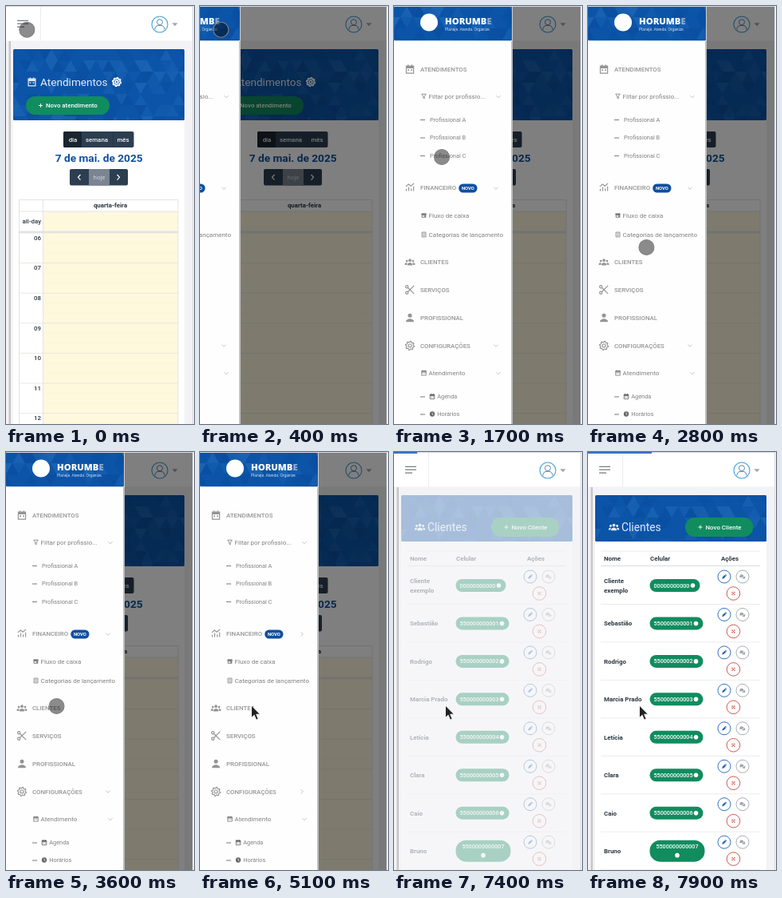
Animation of 236x523 px, one loop 8000 ms. Source, as an HTML page:

```html
<!DOCTYPE html>
<html lang="pt-BR">
<head>
<meta charset="utf-8">
<title>Agenda</title>
<style>
  html, body { margin: 0; width: 100%; height: 100%; overflow: hidden; background: #f3f4f7; }
  svg { display: block; width: 100%; height: 100%; font-family: Roboto, sans-serif; }
</style>
</head>
<body>
<svg id="stage" viewBox="0 0 236 523"></svg>
<script>
const LOOP = 8000, STEP = 100;
const BLUE = '#0e4f9f', GREEN = '#118c5e', INK = '#2b3640', MENU = '#949494', SUBMENU = '#808080';

// ---------- drawing helpers ----------
const rect = (x, y, w, h, fill, r = 0, extra = '') =>
  `<rect x="${x}" y="${y}" width="${w}" height="${h}" rx="${r}" fill="${fill}" ${extra}/>`;
const path = (d, stroke, width = 1, extra = '') =>
  `<path d="${d}" fill="none" stroke="${stroke}" stroke-width="${width}" ${extra}/>`;
const dot = (x, y, r, fill, extra = '') =>
  `<circle cx="${x}" cy="${y}" r="${r}" fill="${fill}" ${extra}/>`;
const text = (x, y, str, size, fill, weight = 400, anchor = 'start', extra = '') =>
  `<text x="${x}" y="${(y + size * 0.355).toFixed(2)}" font-size="${size}" fill="${fill}" ` +
  `font-weight="${weight}" text-anchor="${anchor}" ${extra}>${str}</text>`;
const group = (id, body, extra = '') => `<g id="${id}" ${extra}>${body}</g>`;
const list = (n, fn) => Array.from({ length: n }, (_, i) => fn(i)).join('');

// Icons live in a box from -5 to 5 and take the current colour.
const ring = (x, y, r) => `<circle cx="${x}" cy="${y}" r="${r}"/>`;
const solid = d => `<path d="${d}" fill="currentColor" stroke="none"/>`;
const line = d => `<path d="${d}"/>`;
const cog = 'M' + Array.from({ length: 32 }, (_, i) => {
  const r = i % 4 < 2 ? 4.8 : 3.7, a = (i + 0.5) * Math.PI / 16;
  return `${(r * Math.cos(a)).toFixed(2)} ${(r * Math.sin(a)).toFixed(2)}`;
}).join('L') + 'Z';
const ICONS = {
  calendar: line('M-4-3.5H4V4.5H-4ZM-4-1.4H4M-2-5V-3M2-5V-3') + solid('M-4-3.5H4V-1.8H-4ZM-2.5 .2h1.5v1.5h-1.5ZM1 .2h1.5v1.5H1Z'),
  chart: line('M-4 1.5V4M-1.3-.5V4M1.4 1V4M4-1V4M-4.5-1L-1.5-3.5 1-1.5 4.5-4.5'),
  people: solid('M-1.6-2a1.6 1.6 0 1 1 3.2 0a1.6 1.6 0 1 1-3.2 0ZM-2.8 3.5V2Q0-1 2.8 2V3.5ZM-4.6-1.3a1.2 1.2 0 1 1 2.4 0a1.2 1.2 0 1 1-2.4 0ZM2.2-1.3a1.2 1.2 0 1 1 2.4 0a1.2 1.2 0 1 1-2.4 0ZM-5.5 3V1.5Q-4.5 .2-3 .8L-3.5 3ZM5.5 3V1.5Q4.5 .2 3 .8L3.5 3Z'),
  scissors: line('M-2.2-2.2L4.5 4.5M-2.2 2.2L4.5-4.5') + ring(-3.3, -3.3, 1.4) + ring(-3.3, 3.3, 1.4),
  person: solid('M-2.2-2.4a2.2 2.2 0 1 1 4.4 0a2.2 2.2 0 1 1-4.4 0ZM-4.2 4.5V3Q0-1 4.2 3V4.5Z'),
  gear: line(cog) + ring(0, 0, 1.7),
  funnel: line('M-4-4H4L1 0V4L-1 3V0Z'),
  shop: solid('M-4-4H4L5-1H4V4H-4V-1H-5ZM-2.5 0V2.5H1V0Z'),
  note: line('M-3.5-4.2H3.5V4.2H-3.5ZM-2-1.5H2M-2 1.5H2'),
  clock: solid('M-4.5 0a4.5 4.5 0 1 1 9 0a4.5 4.5 0 1 1-9 0Z') + '<path d="M0-2.6V.3L2 1.4" stroke="#fff"/>',
  pencil: solid('M-4.5 4.5L-3.6 1 1-3.6 3.6-1-1 3.6ZM1.6-4.2L2.4-5Q3-5.2 3.5-4.6L4.6-3.5Q5.2-3 5-2.4L4.2-1.6Z'),
  chat: solid('M-5-1.2a3.4 2.6 0 1 1 6.8 0a3.4 2.6 0 0 1-4.5 2.4L-5 2ZM2.6-1.2Q2.6 1.8-1 2.3A3 2.4 0 0 0 3 3.4L5 4 4.4 2.6Q6 .2 2.6-1.2Z'),
  remove: line('M-3-3L3 3M3-3L-3 3') + line('M-4-1.6L-1.6-4M4 1.6L1.6 4M-4 1.6L-1.6 4M4-1.6L1.6-4'),
};
const icon = (name, x, y, size, color, width = 1.1) =>
  `<g transform="translate(${x} ${y}) scale(${size / 10})" color="${color}" fill="none" ` +
  `stroke="currentColor" stroke-width="${width}">${ICONS[name]}</g>`;

const random = seed => () => (seed = (seed * 16807) % 2147483647) / 2147483647;

// Blue banner with a faint mesh of triangles.
function banner(id, x, y, w, h, seed) {
  const next = random(seed), side = 16, tall = 14;
  let mesh = '';
  for (let row = 0; row * tall < h; row++) {
    for (let i = -1; i * side / 2 < w; i++) {
      const left = x + i * side / 2, top = y + row * tall, up = (i + row) & 1;
      const a = up ? top + tall : top, b = up ? top : top + tall;
      const pick = next(), alpha = next() * 0.1;
      if (pick > 0.5) mesh += `<path d="M${left} ${a}h${side}L${left + side / 2} ${b}Z" ` +
        `fill="${pick > 0.72 ? '#7fc0ff' : '#002a6a'}" opacity="${(alpha + 0.03).toFixed(2)}"/>`;
    }
  }
  return `<clipPath id="${id}">${rect(x, y, w, h, '#000', 1.5)}</clipPath>` +
    `<g clip-path="url(#${id})">${rect(x, y, w, h, '#0b54a8')}${mesh}</g>`;
}

const button = (x, y, w, h, label, textX) =>
  rect(x, y, w, h, GREEN, h / 2) +
  path(`M${textX - 9} ${y + h / 2}h5M${textX - 6.5} ${y + h / 2 - 2.5}v5`, '#fff', 0.9) +
  text(textX, y + h / 2, label, 7.9, '#fff', 500);

// ---------- scenes ----------
const chrome = () =>
  rect(0, 0, 234, 523, '#f3f3f5') + rect(0, 0, 234, 43.5, '#fff') +
  path('M43.5 0V43.5', '#ebebee') + rect(3.5, 44, 2.5, 479, '#c6c6ca') +
  path('M14 18.3H28M14 22.2H28M14 26.1H23', '#777c82', 1.3) +
  dot(193, 23, 10, '#fff', 'stroke="#3c9fdf" stroke-width="1.1"') +
  dot(193, 20.2, 3.5, 'none', 'stroke="#5c88ae"') +
  path('M187 29.5V28Q188 24.5 191 24.3H195Q198 24.5 199 28V29.5', '#5c88ae') +
  '<path d="M208.5 21.2h7l-3.5 4Z" fill="#a3a6aa"/>';

function agenda() {
  const hour = 37.6, top = 284;
  const white = '#f2f4f6';
  return chrome() + rect(9, 54, 215, 469, '#fff', 1.5) + banner('clipA', 9, 54, 215, 89, 77) +
    icon('calendar', 32.5, 95, 11, '#e3ecf6') + text(43, 95.5, 'Atendimentos', 13.6, '#e3ecf6') +
    icon('gear', 139, 95, 11, '#fff', 1.5) +
    button(25, 113, 105, 23, 'Novo atendimento', 50) +
    rect(72, 157, 88.5, 20, '#2c3e50', 2) + rect(72, 157, 23, 20, '#1a252f', 2) +
    path('M134.5 157V177', '#243444') +
    text(84, 166.8, 'dia', 7.9, white, 500, 'middle') +
    text(114, 166.8, 'semana', 7.9, white, 500, 'middle') +
    text(147, 166.8, 'mês', 7.9, white, 500, 'middle') +
    text(116.7, 190, '7 de mai. de 2025', 13.7, BLUE, 700, 'middle') +
    rect(80, 204, 73, 20.5, '#2c3e50', 2) + rect(104, 204, 26, 20.5, '#7a8591') +
    text(117, 214, 'hoje', 7.9, '#cdd3d9', 400, 'middle') +
    path('M93.5 211L90.5 214.3 93.5 217.6M139.5 211L142.5 214.3 139.5 217.6', '#fff', 1.2) +
    rect(47, 257, 169, 25, '#fef8dd') + rect(47, top, 169, 239, '#fef8dd') +
    list(20, i => path(`M${i % 3 ? 47 : 16} ${(top + i * hour / 3).toFixed(1)}H216`,
      i % 3 ? '#f1ecd8' : '#e2e0d8', 0.7, i % 3 ? 'stroke-dasharray="1 1"' : '')) +
    rect(16, 281.5, 200, 2.5, '#e3e3e3') +
    path('M16.5 523V242.5H216V523M16 257H216M46.5 242V523', '#dedee0', 0.8) +
    text(131, 249.5, 'quarta-feira', 7.9, INK, 700, 'middle') +
    text(44, 269, 'all-day', 7.9, INK, 500, 'end') +
    list(7, i => text(44, 290 + i * hour, String(i + 6).padStart(2, '0'), 7.9, INK, 500, 'end'));
}

const chevron = (x, y, cls = '') =>
  `<g transform="translate(${x} ${y})"><path class="${cls}" d="M-2.6-1.3L0 1.3 2.6-1.3" fill="none" stroke="#b9bcc0" stroke-width=".9"/></g>`;

function menu() {
  const heads = [['calendar', 79, 'ATENDIMENTOS'], ['chart', 227, 'FINANCEIRO'], ['people', 320.5, 'CLIENTES'],
    ['scissors', 355, 'SERVIÇOS'], ['person', 390, 'PROFISSIONAL'], ['gear', 425, 'CONFIGURAÇÕES']];
  const subs = [['funnel', 113, 'Filtar por profissio...'], ['shop', 262, 'Fluxo de caixa'],
    ['note', 286, 'Categorias de lançamento'], ['calendar', 459, 'Atendimento']];
  const leaves = [[142, 'Profissional A'], [164.5, 'Profissional B'], [187, 'Profissional C'],
    [488.5, 'Agenda', 'calendar'], [510.5, 'Horários', 'clock']];
  return rect(0, 0, 148, 523, '#fefefe') + rect(147, 44, 2, 479, '#bfbfc1') + rect(148, 0, 1, 44, '#d0d0d2') +
    banner('clipM', 0, 0, 148, 43.5, 4242) +
    dot(44, 20.5, 11, '#fff') +
    text(64, 18.5, 'HORUMB<tspan fill="#8fa9c9">E</tspan>', 11.3, '#fff', 800, 'start', 'font-family="Open Sans, sans-serif"') +
    text(64, 29, 'Planeje. Atenda. Organize.', 4.9, '#d5e2f1') +
    heads.map(([name, y, label]) => icon(name, 20, y, 11.5, MENU, 1) + text(33, y, label, 7.85, MENU, 500)).join('') +
    subs.map(([name, y, label]) => icon(name, 37.5, y, 7, SUBMENU, 1.2) + text(43.6, y + 0.3, label, 8, SUBMENU)).join('') +
    leaves.map(([y, label, name]) => path(`M33 ${y + 0.5}h6`, '#858585', 1.1) +
      (name ? icon(name, 48, y, 7, '#666', 1.2) : '') +
      text(name ? 54.3 : 45, y, label, 7.35, SUBMENU)).join('') +
    rect(81.2, 222.5, 23.3, 11, BLUE, 5.5) + text(92.9, 228, 'NOVO', 5.9, '#fff', 700, 'middle') +
    chevron(131, 113.5) + chevron(128, 228, 'turn') + chevron(128, 425, 'turn') + chevron(131, 459.5);
}

const CLIENTS = [['Cliente exemplo', '00000000000'], ['Sebastião', '550000000001'], ['Rodrigo', '550000000002'],
  ['Marcia Prado', '550000000003'], ['Letícia', '550000000004'], ['Clara', '550000000005'],
  ['Caio', '550000000006'], ['Bruno', '5500000000007']];

function clientRow([name, phone], i) {
  const y = 167 + i * 47.45, long = phone.length > 12, width = phone.length < 12 ? 63 : 67;
  const action = (x, dy, color, name, size, r) =>
    dot(x, y + dy, r, '#fff', `stroke="${color}" stroke-width=".9"`) + icon(name, x, y + dy, size, color, 1.6);
  const words = i ? [name] : name.split(' ');
  return words.map((word, k) => text(20, y + (k - (words.length - 1) / 2) * 12, word, 7.9, INK, 700)).join('') +
    (long
      ? rect(77.5, y - 13.5, 69, 27, GREEN, 13) + text(112, y - 5.5, phone, 7.2, '#fff', 500, 'middle') + dot(112, y + 5.5, 2.8, '#fff')
      : rect(77.5, y - 8, width, 16, GREEN, 8) + text(82.5, y, phone, 7.2, '#fff', 500) + dot(77.5 + width - 9, y, 2.8, '#fff')) +
    action(171, -11, '#1c62b5', 'pencil', 6, 8) + action(194, -11, '#a2a5a9', 'chat', 7, 8) +
    action(182.5, 10, '#c9473f', 'remove', 5.5, 8.3) +
    path(`M16 ${y + 23.5}H216`, '#e6e8eb', 0.8);
}

const clients = () => chrome() + group('card',
  rect(9, 54, 215, 469, '#fff', 1.5) + banner('clipB', 9, 54, 215, 58, 77) +
  icon('people', 32.5, 94, 12, '#e3ecf6') + text(42, 94, 'Clientes', 13.8, '#e3ecf6') +
  button(122, 82, 85.5, 24, 'Novo Cliente', 147.5) +
  path('M16 124H216', '#e6e8eb', 0.8) + path('M16 142.5H216', '#d9dce0', 1.2) +
  text(20, 133.5, 'Nome', 7.9, INK, 700) + text(78, 133.5, 'Celular', 7.9, INK, 700) +
  text(178, 133.5, 'Ações', 7.9, INK, 700, 'middle') + CLIENTS.map(clientRow).join(''));

document.getElementById('stage').innerHTML =
  rect(0, 0, 236, 523, '#f3f4f7') +
  group('agenda', agenda()) +
  group('shade', rect(0, 0, 234, 523, '#000', 0, 'opacity=".5"')) +
  group('menu', menu()) +
  group('clients', clients()) +
  path('M0 .5H236', '#d6d6da') + rect(234, 0, 2, 523, '#f7f7f8') + path('M234.5 0V523', '#d9d9dc') +
  rect(0, 0, 1, 2, '#3a72bd', 0, 'id="loader"') +
  group('touch', dot(0, 0, 9.5, '#000', 'fill-opacity=".45" stroke="#808080" stroke-width="1.1"')) +
  group('arrow', '<path d="M0 0V15.5L3.6 12.2 6.1 18.2 8.7 17.1 6.2 11.2H11Z" fill="#222" stroke="#fff" stroke-width=".9"/>',
    'transform="translate(64.5 317)"');

// ---------- motion: [time, value...] ----------
const TOUCH = [[1500, 26.3, 29.7], [1600, 43, 108], [1700, 60, 189], [1800, 60, 189], [1900, 77, 215], [2000, 92, 238],
  [2200, 92, 238], [2300, 87, 247], [2400, 82, 255], [2500, 82, 255], [2600, 79, 270], [2700, 75, 288],
  [2800, 73.4, 302], [3200, 73, 314.5], [3300, 73, 314.5], [3600, 63.5, 318]];
const SLIDE = [[300, -149], [400, -98], [500, -34], [600, -8], [700, 0]];
const TURN = [[4200, 0], [4700, -90]];
const FADE = [[7300, 0.1], [7700, 1]];
const LOADER = [[6400, 0], [6600, 19], [7300, 19], [7900, 80]];

function at(table, t) {
  const next = table.findIndex(row => row[0] > t);
  if (next === 0) return table[0].slice(1);
  if (next < 0) return table[table.length - 1].slice(1);
  const [t0, ...from] = table[next - 1], [t1, ...to] = table[next];
  return from.map((v, i) => v + (to[i] - v) * (t - t0) / (t1 - t0));
}

const el = Object.fromEntries(['agenda', 'shade', 'menu', 'clients', 'card', 'loader', 'touch', 'arrow']
  .map(id => [id, document.getElementById(id)]));
const turning = document.querySelectorAll('.turn');
const show = (node, on) => node.setAttribute('visibility', on ? 'visible' : 'hidden');

function render(t) {
  const open = t >= 400 && t < 5800;
  show(el.agenda, t < 5800);
  show(el.shade, open);
  show(el.menu, open);
  show(el.clients, t >= 7400);
  show(el.touch, t < 4900);
  show(el.arrow, t >= 4900);
  el.menu.setAttribute('transform', `translate(${at(SLIDE, t)} 0)`);
  el.touch.setAttribute('transform', `translate(${at(TOUCH, t).join(' ')})`);
  turning.forEach(node => node.setAttribute('transform', `rotate(${at(TURN, t)})`));
  el.card.setAttribute('opacity', at(FADE, t));
  el.loader.setAttribute('width', at(LOADER, t));
}

// The screen refreshes at ten pictures a second.
const start = performance.now();
function tick() {
  const t = (performance.now() - start) % LOOP;
  render(Math.floor(t / STEP) * STEP);
  requestAnimationFrame(tick);
}
tick();
</script>
</body>
</html>
```
